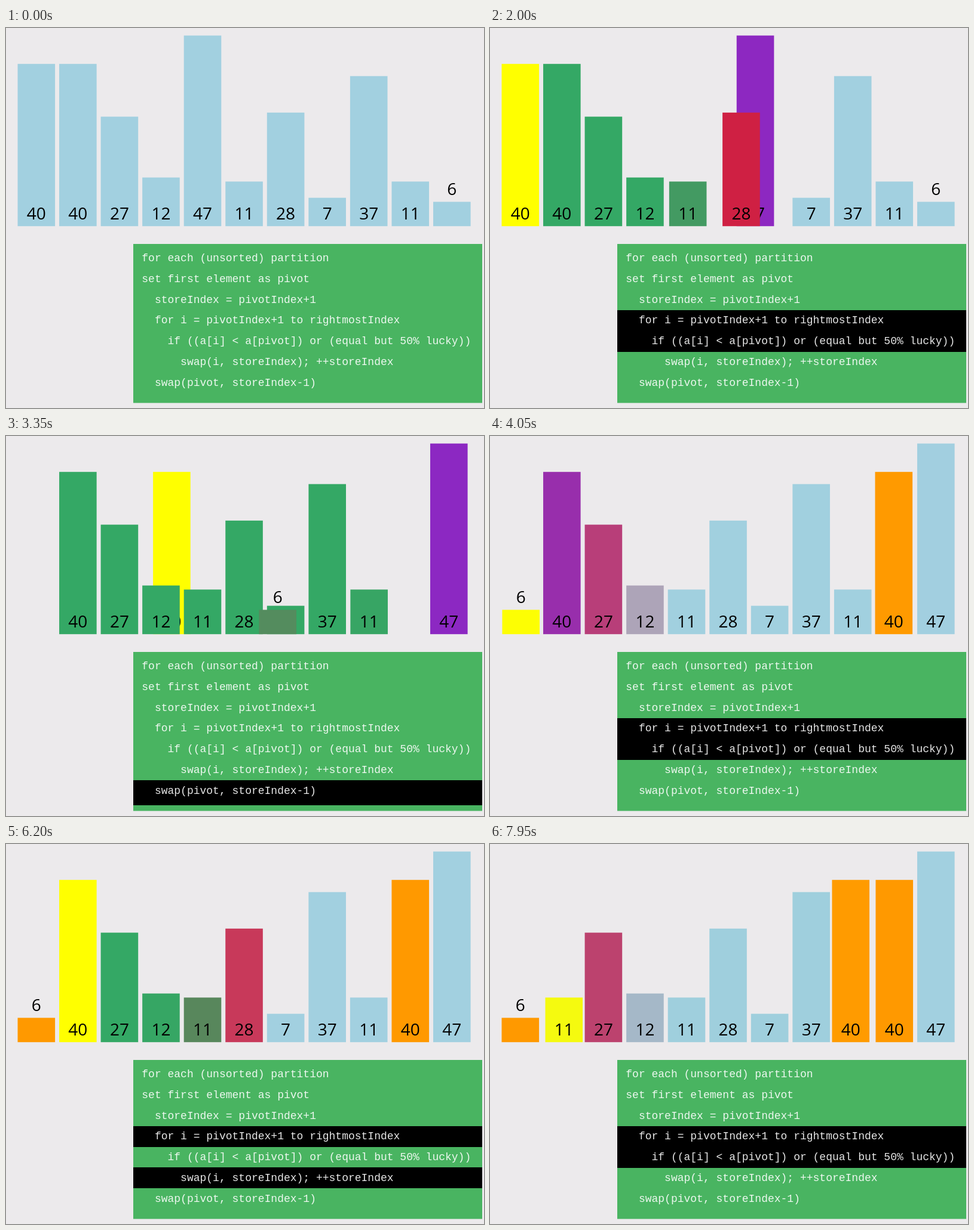
Animation of 800x637 px, one loop 8 s. Source, as an HTML page with a canvas:

```html
<!DOCTYPE html>
<html lang="en">
<head>
<meta charset="utf-8">
<title>Quick sort</title>
<style>
  html, body { margin: 0; width: 100%; height: 100%; overflow: hidden; background: #eceaec; }
  canvas { display: block; }
</style>
</head>
<body>
<canvas id="stage" width="800" height="637"></canvas>
<script>
const ctx = document.getElementById('stage').getContext('2d');
const LOOP = 8000, TRANSITION = 245;
const VALUES = [40, 40, 27, 12, 47, 11, 28, 7, 37, 11, 6];
const COLORS = {
  plain: [162, 208, 224], pivot: [255, 255, 0], checked: [212, 12, 50],
  left: [52, 168, 101], right: [140, 40, 194], sorted: [255, 153, 0]
};
const CODE = [
  'for each (unsorted) partition',
  'set first element as pivot',
  '  storeIndex = pivotIndex+1',
  '  for i = pivotIndex+1 to rightmostIndex',
  '    if ((a[i] < a[pivot]) or (equal but 50% lucky))',
  '      swap(i, storeIndex); ++storeIndex',
  '  swap(pivot, storeIndex-1)'
];

const slotX = slot => 19.5 + 69.55 * slot;
const lerp = (a, b, p) => a + (b - a) * p;
const ease = x => x >= 1 ? 1 : x < 0.5 ? 4 * x ** 3 : 1 - 4 * (1 - x) ** 3;

// Step number and start time; steps between are evenly spaced.
const PACE = [[1, 305], [13, 1985], [22, 3241], [27, 3957], [37, 5250], [48, 6883], [55, 7875], [56, 8015]];
function stepTime(step) {
  const i = PACE.findIndex(([n]) => n > step);
  if (i < 0) return Infinity;
  const [n0, t0] = PACE[i - 1], [n1, t1] = PACE[i];
  return lerp(t0, t1, (step - n0) / (n1 - n0));
}

// Runs the sort once and records every step.
function recordSteps() {
  const order = VALUES.map((_, i) => i);
  const colors = VALUES.map(() => 'plain');
  const steps = [];
  const paint = (slot, color) => { colors[order[slot]] = color; };
  const swap = (a, b) => { [order[a], order[b]] = [order[b], order[a]]; };
  const push = (...lines) => steps.push({
    start: stepTime(steps.length + 1),
    lines,
    bars: VALUES.map((_, i) => [slotX(order.indexOf(i)), ...COLORS[colors[i]]])
  });

  function sort(first, last) {
    if (first >= last) return;
    paint(first, 'pivot');
    push(1, 2, 3);
    let store = first + 1;
    for (let i = first + 1; i <= last; i++) {
      paint(i, 'checked');
      push(4, 5);
      if (VALUES[order[i]] <= VALUES[order[first]]) {
        swap(i, store);
        push(4, 6);
        paint(store++, 'left');
      } else {
        paint(i, 'right');
      }
    }
    push(7);
    const middle = store - 1;
    if (middle !== first) {
      swap(first, middle);
      push(7);
    }
    for (let i = first; i <= last; i++) paint(i, i === middle ? 'sorted' : 'plain');
    push(7);
    sort(first, middle - 1);
    sort(middle + 1, last);
  }
  sort(0, VALUES.length - 1);
  return steps.filter(step => step.start < LOOP);
}
const STEPS = recordSteps();

// Each step interrupts the running transition and eases on from there.
function stateAt(t) {
  let bars = VALUES.map((_, i) => [slotX(i), ...COLORS.plain]);
  let lines = [];
  STEPS.forEach((step, k) => {
    if (step.start > t) return;
    const end = k + 1 < STEPS.length ? STEPS[k + 1].start : LOOP;
    const p = ease((Math.min(t, end) - step.start) / TRANSITION);
    bars = bars.map((bar, i) => bar.map((v, j) => lerp(v, step.bars[i][j], p)));
    lines = step.lines;
  });
  return { bars, lines };
}

function drawBar(value, [x, ...rgb]) {
  const height = 6.8 * value, top = 332.2 - height;
  ctx.fillStyle = `rgb(${rgb.map(Math.round)})`;
  ctx.fillRect(x, top, 62.6, height);
  ctx.fillStyle = '#000';
  ctx.fillText(value, x + 31.3, height < 45 ? top - 11.4 : 320.5);
}

function drawCode(lines) {
  ctx.fillStyle = '#49b461';
  ctx.fillRect(213, 362, 584, 266.5);
  ctx.fillStyle = '#000';
  for (const n of lines) {
    ctx.fillRect(213, Math.round(334.1 + 34.7 * n), 584, n === 7 ? 42 : 35);
  }
  ctx.fillStyle = 'rgba(255, 255, 255, 0.9)';
  CODE.forEach((text, i) => ctx.fillText(text, 227.3, 391 + 34.75 * i));
}

function draw(t) {
  const { bars, lines } = stateAt(t);
  ctx.fillStyle = '#eceaec';
  ctx.fillRect(0, 0, 800, 637);
  ctx.textAlign = 'center';
  ctx.font = '28px "Open Sans", "Noto Sans", sans-serif';
  bars.forEach((bar, i) => drawBar(VALUES[i], bar));
  ctx.textAlign = 'left';
  ctx.font = '18px "Liberation Mono", monospace';
  drawCode(lines);
}

const began = performance.now();
function frame() {
  draw((performance.now() - began) % LOOP);
  requestAnimationFrame(frame);
}
frame();
</script>
</body>
</html>
```
